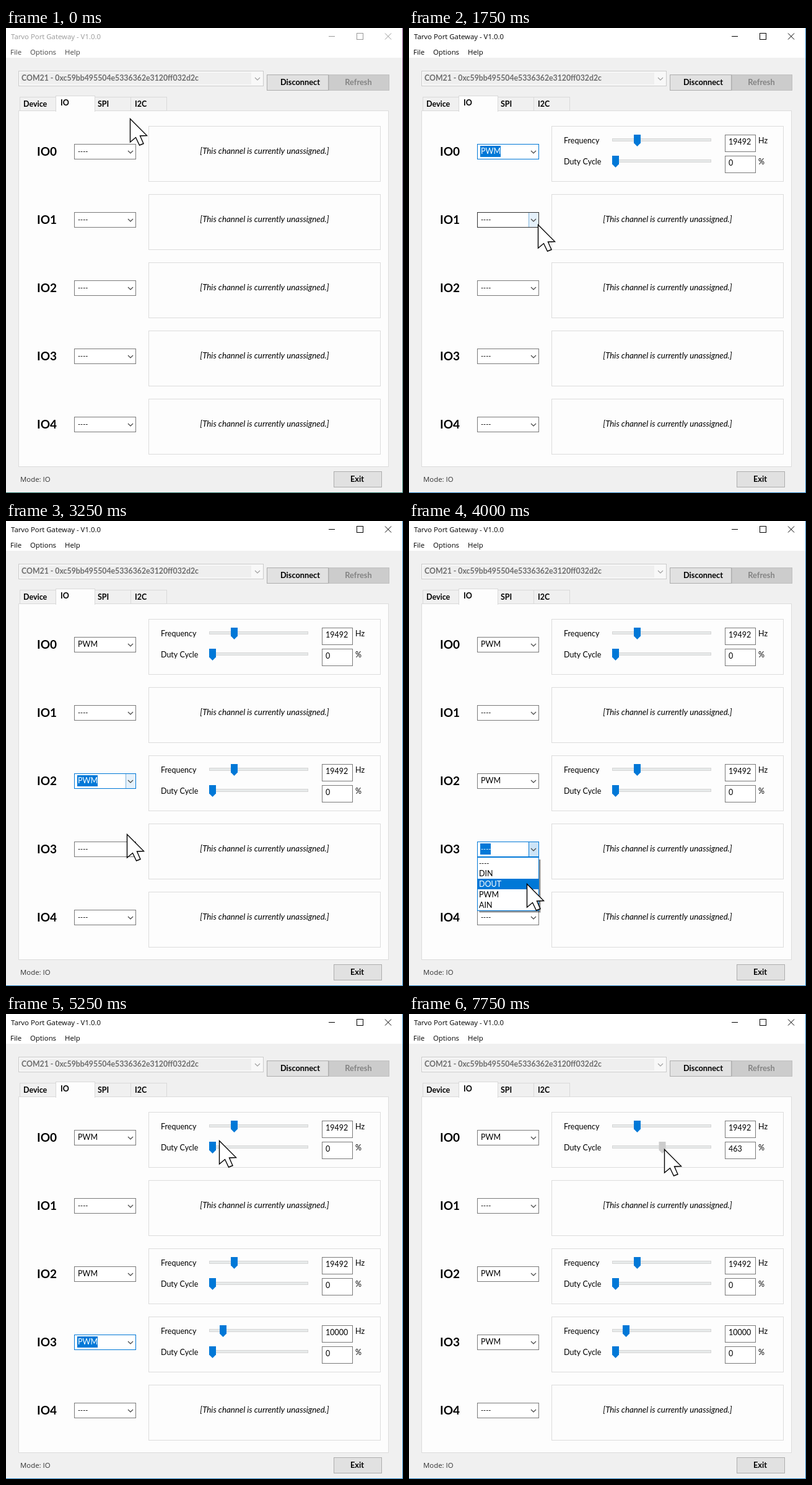
Recreate the animation shown at these times as an HTML page with a canvas. Size 641x750 px, loop 8 s.

```html
<!DOCTYPE html>
<html lang="en">
<head>
<meta charset="utf-8">
<title>Port adapter IO panel</title>
<style>
  html, body { margin: 0; width: 100%; height: 100%; overflow: hidden; background: #f0f0f0; }
  canvas { display: block; }
</style>
</head>
<body>
<canvas id="stage" width="641" height="750"></canvas>
<script>
const ctx = document.getElementById('stage').getContext('2d');
const LOOP = 8000, STEP = 250;
const BLUE = '#0078d7';
const UI = '11.4px "Open Sans", sans-serif';
const BODY = '12.5px Lato, sans-serif';
const BOLD = 'bold 12.5px Lato, sans-serif';
const ITEMS = ['----', 'DIN', 'DOUT', 'PWM', 'AIN'];

// Pointer path: time, x, y
const PATH = [
  [0, 200, 146], [250, 203, 175], [500, 205, 196], [1250, 190, 268], [1500, 195, 277],
  [1750, 208, 317], [2000, 206, 385], [2250, 204, 412], [2500, 190, 486], [2750, 190, 490],
  [3250, 195, 505], [3500, 202, 525], [3750, 196, 560], [4000, 190, 585], [4250, 190, 603],
  [4500, 191, 604], [5000, 360, 162], [5250, 344, 204], [5500, 337, 212], [5750, 335, 214],
  [6000, 335, 214], [6250, 355, 217], [6750, 390, 218], [7250, 390, 218], [7500, 404, 218],
  [7750, 412, 218]
];

// Per channel: list opens, mode is chosen, focus leaves
const ROWS = [
  { open: 500, chosen: 1500, blur: 2250, freq: 19492, freqX: 368 },
  {},
  { open: 2250, chosen: 2750, blur: 3750, freq: 19492, freqX: 368 },
  { open: 3750, chosen: 4500, blur: 6250, freq: 10000, freqX: 350 },
  {}
];
const DRAG_START = 6250, THUMB_MIN = 333;

const within = (t, from, to) => t >= from && t < to;

function pointerAt(t) {
  const next = PATH.findIndex(key => key[0] > t);
  if (next < 1) return PATH[next < 0 ? PATH.length - 1 : 0].slice(1);
  const [t0, x0, y0] = PATH[next - 1], [t1, x1, y1] = PATH[next];
  const k = (t - t0) / (t1 - t0);
  return [Math.round(x0 + (x1 - x0) * k), Math.round(y0 + (y1 - y0) * k)];
}

function dutyThumb(t) {
  return t < DRAG_START ? THUMB_MIN : pointerAt(t)[0] - 3.5;
}

function fill(x, y, w, h, color) {
  ctx.fillStyle = color;
  ctx.fillRect(x, y, w, h);
}

function box(x, y, w, h, color, border) {
  fill(x, y, w, h, border);
  fill(x + 1, y + 1, w - 2, h - 2, color);
}

function text(str, x, y, font = BODY, color = '#000', align = 'left') {
  ctx.font = font;
  ctx.fillStyle = color;
  ctx.textAlign = align;
  ctx.fillText(str, x, y);
}

function line(points, color, width = 1) {
  ctx.beginPath();
  points.forEach(([x, y]) => ctx.lineTo(x, y));
  ctx.strokeStyle = color;
  ctx.lineWidth = width;
  ctx.stroke();
}

function chevron(x, y, color) {
  line([[x - 4, y - 2], [x, y + 2], [x + 4, y - 2]], color, 1.2);
}

function button(label, x, y, w, h, center, enabled = true) {
  box(x, y, w, h, enabled ? '#e1e1e1' : '#cccccc', enabled ? '#adadad' : '#bfbfbf');
  text(label, center, y + 17, 'bold 12.8px Lato, sans-serif', enabled ? '#000' : '#838383', 'center');
}

function drawWindow(active) {
  fill(0, 0, 641, 750, '#f0f0f0');
  fill(0, 0, 641, 48, '#fff');
  const ink = active ? '#000' : '#999';
  text('Tarvo Port Gateway - V1.0.0', 8, 18, UI, ink);
  fill(521, 13, 10, 1, ink);
  box(566, 8, 11, 11, '#fff', ink);
  line([[612, 8.5], [622, 18.5]], ink);
  line([[622, 8.5], [612, 18.5]], ink);
  [['File', 7], ['Options', 39], ['Help', 95]].forEach(([name, x]) =>
    text(name, x, 43, UI, active ? '#000' : '#444'));

  box(20, 69, 396, 25, '#f8f8f8', '#cccccc');
  fill(23, 72, 373, 19, '#efefef');
  text('COM21 - 0xc59bb495504e5336362e3120ff032d2c', 25, 85, 'bold 12.3px Lato, sans-serif', '#6d6d6d');
  chevron(406, 82, '#a0a0a0');
  button('Disconnect', 421, 75, 100, 26, 475);
  button('Refresh', 521, 75, 98, 26, 569, false);

  box(20, 133, 598, 575, '#fdfdfd', '#dcdcdc');
  [['Device', 22, 59, 28], ['SPI', 143, 59, 148], ['I2C', 201, 59, 208]].forEach(([name, x, w, tx]) => {
    box(x, 111, w, 23, '#f0f0f0', '#d9d9d9');
    text(name, tx, 127, BOLD);
  });
  box(80, 109, 64, 26, '#fdfdfd', '#d9d9d9');
  fill(81, 133, 62, 3, '#fdfdfd');
  text('IO', 88, 125, BOLD);

  text('Mode: IO', 23, 732, UI, '#333');
  button('Exit', 529, 715, 78, 26, 567);

  const edge = ctx.createLinearGradient(0, 0, 0, 750);
  edge.addColorStop(0, active ? '#2b83c4' : '#7a3f80');
  edge.addColorStop(1, active ? '#2b83c4' : '#2f7a70');
  fill(640, 0, 1, 750, edge);
  fill(0, 749, 641, 1, edge);
}

function slider(name, y, thumbX, value, unit, dragging) {
  text(name, 250, y + 6);
  box(328, y - 2, 160, 5, '#e7eaea', '#d6d6d6');
  ctx.beginPath();
  [[-5.5, -8], [5.5, -8], [5.5, 5.5], [0, 11], [-5.5, 5.5]].forEach(([dx, dy]) =>
    ctx.lineTo(thumbX + .5 + dx, y + dy));
  ctx.fillStyle = dragging ? '#cccccc' : BLUE;
  ctx.fill();
  box(510, y - 8, 50, 28, '#fff', '#7a7a7a');
  text(value, 516, y + 8);
  text(unit, 564, y + 6);
}

function drawCombo(y, label, focused, open, hover) {
  const border = focused ? BLUE : hover ? '#333' : '#7a7a7a';
  box(110, y - 12, 100, 25, '#fff', border);
  if (open || hover) {
    box(193, y - 12, 17, 25, open ? '#cce4f7' : '#e5f1fb', open ? BLUE : '#7eb4dc');
    if (!open) {
      fill(193, y - 12, 17, 1, border);
      fill(193, y + 12, 17, 1, border);
      fill(209, y - 12, 1, 25, border);
    }
  }
  chevron(201, y + 1, '#444');
  const dashes = label === ITEMS[0];
  if (focused) fill(115, y - 9, dashes ? 17 : 33, 18, BLUE);
  text(label, 116, y + 4, dashes ? '11px Lato, sans-serif' : BODY, focused ? '#fff' : '#000');
}

function drawList(y, pointerY) {
  const top = y + 13;
  fill(114, top + 4, 99, 86, 'rgba(0,0,0,.18)');
  fill(113, top + 4, 99, 85, 'rgba(0,0,0,.3)');
  box(110, top, 100, 87, '#fff', BLUE);
  const chosen = Math.min(4, Math.max(0, Math.floor((pointerY - top - 1) / 17)));
  ITEMS.forEach((item, i) => {
    const itemY = top + 1 + i * 17;
    if (i === chosen) fill(111, itemY, 98, 17, BLUE);
    text(item, 113, itemY + 13, i ? BODY : '11px Lato, sans-serif', i === chosen ? '#fff' : '#000');
  });
}

function drawRow(row, i, t, [px, py]) {
  const y = 199 + i * 110;
  const assigned = t >= row.chosen;
  const leaving = i === 2 && within(t, 2750, 3500);
  const hover = leaving || (within(px, 110, 210) && Math.abs(py - y) <= 12);
  text('IO' + i, 50, y + 7, 'bold 19px Lato, sans-serif');
  drawCombo(y, assigned ? 'PWM' : ITEMS[0], within(t, row.open, row.blur),
    within(t, row.open, row.chosen), hover);
  box(230, y - 41, 375, 90, '#fdfdfd', '#dcdcdc');
  if (!assigned) {
    text('[This channel is currently unassigned.]', 417.5, y + 4, 'italic 13.3px Lato, sans-serif', '#000', 'center');
    return;
  }
  const dragging = i === 0 && t >= DRAG_START;
  // The number box trails the thumb by one refresh.
  const duty = dragging ? Math.round((dutyThumb(t - STEP) - THUMB_MIN) * 1023 / 149) : 0;
  slider('Frequency', y - 19, row.freqX, row.freq, 'Hz', false);
  slider('Duty Cycle', y + 15, dragging ? dutyThumb(t) : THUMB_MIN, duty, '%', dragging);
}

function drawPointer([x, y]) {
  ctx.beginPath();
  [[0, 0], [27, 27], [16, 27.5], [21.5, 40], [15, 42.5], [9, 30], [0, 37.5]].forEach(([dx, dy]) =>
    ctx.lineTo(x + .5 + dx, y + .5 + dy));
  ctx.closePath();
  ctx.fillStyle = '#fff';
  ctx.fill();
  ctx.strokeStyle = '#000';
  ctx.lineWidth = 1.4;
  ctx.stroke();
}

function render(now) {
  const t = Math.floor(now % LOOP / STEP) * STEP;
  const pointer = pointerAt(t);
  drawWindow(t >= STEP);
  ROWS.forEach((row, i) => drawRow(row, i, t, pointer));
  ROWS.forEach((row, i) => {
    if (within(t, row.open, row.chosen)) drawList(199 + i * 110, pointer[1]);
  });
  drawPointer(pointer);
}

const start = performance.now();
function tick() {
  render(performance.now() - start);
  requestAnimationFrame(tick);
}
tick();
</script>
</body>
</html>
```
